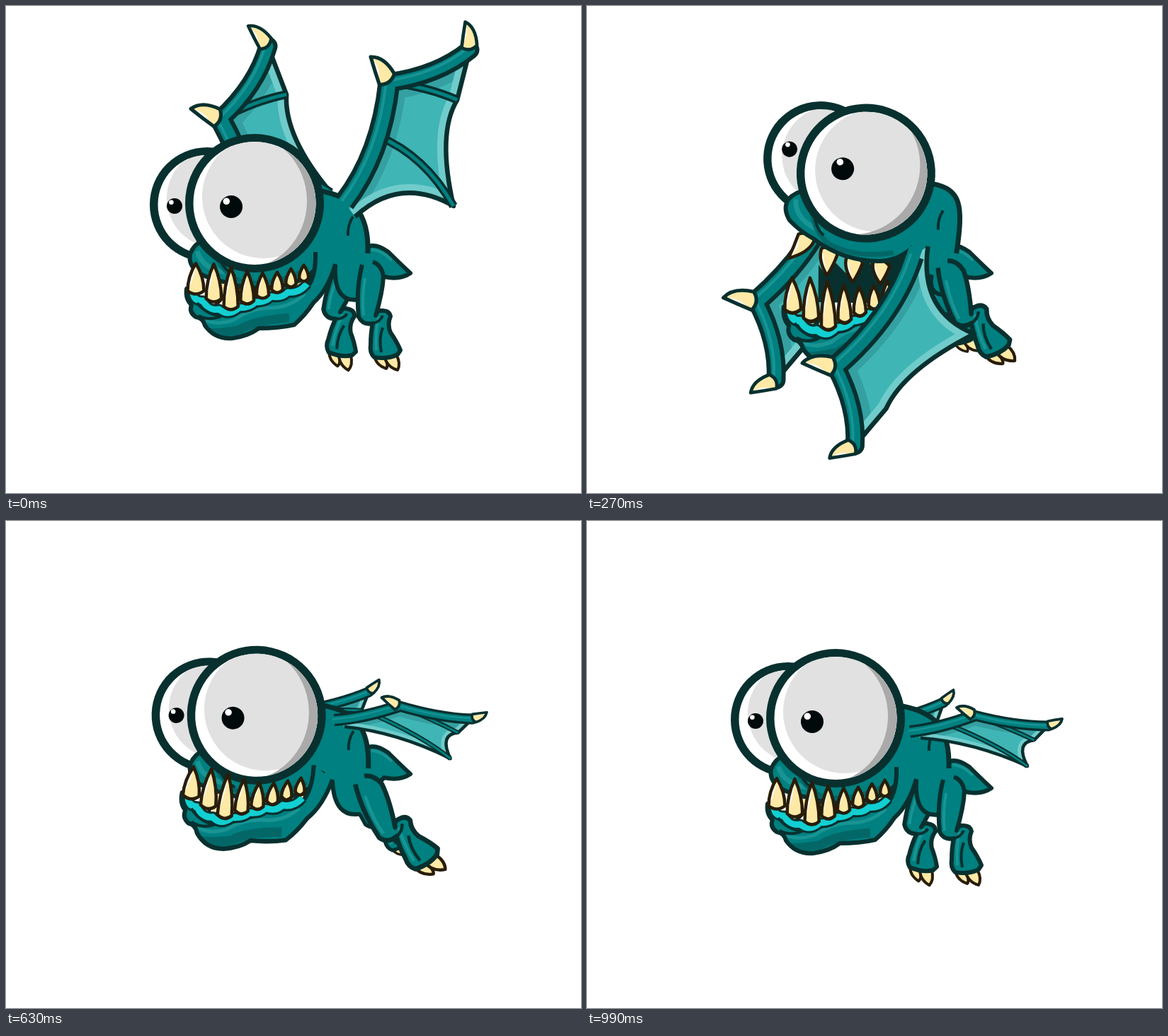
These frames come from a looping animation (812x689 px, 1.08 s). An HTML page with a canvas:

```html
<!DOCTYPE html>
<html lang="en">
<head>
<meta charset="utf-8">
<title>Flying monster</title>
<style>
html, body { margin: 0; width: 100%; height: 100%; overflow: hidden; background: #fff; }
canvas { display: block; }
</style>
</head>
<body>
<canvas id="stage" width="812" height="689"></canvas>
<script>
const ctx = document.getElementById('stage').getContext('2d');
const STEP = 90, STEPS = 12;
const INK = '#08302f', TEAL = '#008080', LIGHT = '#189494', SHADE = '#046767';
const BROWN = '#291d0a', CREAM = '#ffe9a6';

const lerp = (a, b, t) => a + (b - a) * t;
const mix = (a, b, t) => a.map((v, i) => lerp(v, b[i], t));
const P = d => new Path2D(d);

// Rotation and scale around one point, which lands on another
const pivot = (from, to, turn, sx = 1, sy = sx) =>
  new DOMMatrix().translate(...to).rotate(turn).scale(sx, sy).translate(-from[0], -from[1]);

// Wing skeletons: shoulder, wrist, finger tip, web corner, wrist claw,
// curl, and the far wing's turn and offset
const UP = [[478, 278], [541, 108], [655, 62], [632, 283], [515, 72], [1], [-35, -238, 52]];
const FLAT = [[456, 298], [547, 275], [651, 290], [622, 347], [522, 264], [.45], [-25, -144, 12]];
const DOWN = [[455, 368], [404, 552], [467, 648], [573, 443], [358, 563], [-1], [0, -136, -50]];

const SNOUT = P('M280 330Q265 337 260 351Q257 366 272 378Q292 388 312 391Q336 399 362 399Q390 398 413 389Q438 378 448 355');
const MOUTH = P('M304 395L306 349L317 364L330 347L344 360L353 347L364 356L374 343L384 356L396 335L440 350L440 385L425 400Z');
const JAW = P('M437 348Q438 382 426 397Q405 400 380 414Q355 425 330 432Q302 438 280 422Q268 412 255 400Q253 415 262 423Q258 433 268 440Q278 441 281 452Q295 472 320 470Q342 467 357 456Q385 456 407 451Q422 438 434 420Q455 401 465 365');
const GUM = P('M264 406Q266 418 278 417Q286 432 301 429Q314 440 329 427Q345 427 352 419Q368 419 374 411Q391 414 398 405Q414 407 425 393');
const CHIN = P('M281 445Q300 452 322 444Q345 428 372 427Q402 427 422 407');
const LOWLIP = P('M270 420Q282 436 304 439Q286 446 272 438');
const LEG = P('M503 366Q494 400 498 440Q504 452 518 449Q515 462 515 479Q513 490 520 497Q540 500 553 493L557 487Q552 475 543 462Q538 450 543 439Q541 430 530 431Q524 430 522 438Q532 405 533 382Q530 366 518 362');
const TOES = ['M520 494Q522 508 537 513Q541 508 534 496Z', 'M534 495Q538 511 553 515Q558 506 551 493Z'].map(P);
const TAIL = P('M508 342Q520 334 540 348Q552 360 571 378Q556 388 534 383Q520 400 505 392');

function fill(path, color) { ctx.fillStyle = color; ctx.fill(path); }
function stroke(path, color, width, cap = 'butt') {
  ctx.strokeStyle = color;
  ctx.lineWidth = width;
  ctx.lineCap = cap;
  ctx.stroke(path);
}
function shape(path, color, ink, width) { fill(path, color); stroke(path, ink, width); }

function within(m, draw) {
  ctx.save();
  ctx.transform(m.a, m.b, m.c, m.d, m.e, m.f);
  draw();
  ctx.restore();
}

function clipped(path, draw) {
  ctx.save();
  ctx.clip(path);
  draw();
  ctx.restore();
}

function tooth(tx, ty, bx, by, h) {
  const my = lerp(ty, by, .45), d = Math.sign(by - ty) * 3;
  const left = `M${tx} ${ty}Q${bx - h} ${my} ${bx - h} ${by - d}`;
  const body = P(`${left}Q${bx} ${by + 2 * d} ${bx + h} ${by - d}Q${bx + h} ${my} ${tx} ${ty}Z`);
  fill(body, CREAM);
  fill(P(`${left}Q${bx - h * .1} ${my} ${tx} ${ty}Z`), '#fff');
  stroke(body, BROWN, 4.5);
}

function lowerTeeth() {
  for (let i = 7; i >= 0; i--) {
    const x = 268 + 26 * i - .6 * i * i;
    const base = 428 - (i < 2 ? 11 : 8) * Math.abs(i - 2);
    tooth(x, 371 + 7 * Math.sin(i * .8 - 1.8), x, base, 11.5 - .7 * i);
  }
}

function upperTeeth() {
  for (let i = 0; i < 4; i++) {
    const x = 302 + 37.5 * i, y = 389 + 9 * Math.sin(i * Math.PI / 3);
    tooth(x + (i ? 8 : -14), y + 40 - 3 * i, x, y, 12);
  }
}

function claw(base, tip, half) {
  const dx = tip[0] - base[0], dy = tip[1] - base[1], len = Math.hypot(dx, dy) || 1;
  const nx = -dy / len * half, ny = dx / len * half;
  const at = (t, s) => `${base[0] + dx * t + nx * s} ${base[1] + dy * t + ny * s}`;
  const body = P(`M${at(.12, -1)}Q${at(.55, -.55)} ${at(1, 0)}Q${at(.75, 1.25)} ${at(.12, 1)}Q${at(-.1, 0)} ${at(.12, -1)}Z`);
  fill(body, CREAM);
  fill(P(`M${at(.2, -1)}Q${at(.6, -.5)} ${at(1, 0)}Q${at(.5, .3)} ${at(.2, -1)}Z`), '#fff');
  stroke(body, INK, 2.5 + half / 5);
}

function wing([S, W, T, corner, tip, [curl]], spread) {
  const w = .45 + .55 * curl * curl;
  // Point beside the line a-b, in units of its length
  const beside = (a, b, t, side) => [
    lerp(a[0], b[0], t) - (b[1] - a[1]) * side,
    lerp(a[1], b[1], t) + (b[0] - a[0]) * side
  ];
  const M = beside(S, W, .45, .14 * curl), F = beside(W, T, .55, .14 * curl);
  const along = 1 - .35 * Math.abs(curl);
  const D = beside(W, T, along, .48 * curl), A = mix(T, D, .5);
  const B = mix(S, corner, spread), R = [S[0] + 15, S[1] + 20 * curl];
  const pull = (a, b) => mix(mix(a, b, .5), W, .28);

  const bones = `Q${M} ${W}Q${F} ${T}`;
  const rim = `L${A}L${D}Q${pull(D, B)} ${B}Q${pull(B, R)} ${R}`;
  const edge = P(`M${T}${rim}`), web = P(`M${S}${bones}${rim}Z`);
  const arm = P(`M${S}Q${M} ${W}`), finger = P(`M${W}Q${F} ${T}`);

  fill(web, '#40b5b5');
  clipped(web, () => {
    stroke(P(`M${S}${bones}`), '#35a0a1', 50 * w);
    stroke(edge, '#70cccb', 25 * w);
  });
  stroke(edge, INK, 2 + 4.5 * w);

  if (curl > 0) {
    const elbow = mix(mix(S, M, .6), mix(M, W, .6), .6);
    const ribs = P(`M${W}Q${mix(mix(W, D, .5), T, .1)} ${D}M${elbow}Q${mix(mix(elbow, B, .5), D, .22)} ${B}`);
    stroke(ribs, INK, 12 * w);
    stroke(ribs, TEAL, 5 * w);
  }

  stroke(arm, INK, 31 * w);
  stroke(finger, INK, 27 * w, 'round');
  stroke(P(`M${mix(S, M, -.14)}L${S}Q${M} ${W}`), TEAL, 19 * w);
  stroke(finger, TEAL, 15 * w, 'round');
  within(new DOMMatrix().translate(-4 * w, -2 * w), () => stroke(P(`M${S}${bones}`), LIGHT, 4 * w));

  const aim = Math.atan2(T[1] - F[1], T[0] - F[0]) - curl * Math.PI / 3;
  claw(W, tip, 13 * w);
  claw(T, [T[0] + 40 * w * Math.cos(aim), T[1] + 40 * w * Math.sin(aim)], 11 * w);
}

function disc(x, y, rx, ry, color) {
  ctx.beginPath();
  ctx.ellipse(x, y, rx, ry, 0, 0, 7);
  ctx.fillStyle = color;
  ctx.fill();
}

function eye(x, y, r, px, py, pr) {
  disc(x, y, r, r, INK);
  const ball = new Path2D(), shade = new Path2D();
  ball.ellipse(x, y, r - 11.5, r - 11, 0, 0, 7);
  shade.rect(x - 120, y - 120, 240, 240);
  shade.ellipse(x - 18, y - 3, r - 6, r - 2, 0, 0, 7);
  fill(ball, '#fff');
  clipped(ball, () => {
    disc(x + 13, y - 9, r - 11, r - 11, '#e1e1e1');
    ctx.fillStyle = '#aaa';
    ctx.fill(shade, 'evenodd');
  });
  disc(px, py, pr, pr, '#000a0a');
  disc(px - pr * .42, py - pr * .48, pr * .3, pr * .3, '#fff');
}

function leg(x, y, turn, scale) {
  within(pivot([515, 385], [x, y], turn, scale), () => {
    TOES.forEach(t => shape(t, CREAM, BROWN, 4));
    shape(LEG, TEAL, INK, 6);
    stroke(P('M507 385Q502 415 505 438M526 440Q521 465 523 487'), LIGHT, 4);
    stroke(P('M518 449Q528 447 532 438M532 455Q526 470 530 490'), INK, 4);
  });
}

function drawBody(dx, dy, head, jaw) {
  const at = (m, x, y) => { const q = m.transformPoint(new DOMPoint(x, y)); return `${q.x} ${q.y}`; };
  const nx = 446 + .97 * dx, ny = 262 + .25 * dy;
  const back = `M${nx} ${ny}C${nx + 40} ${ny + 8} ${513 + .45 * dx} ${288 + .2 * dy} ${511 + .25 * dx} 350`;
  const low = `${500 + .25 * dx} ${415 + .15 * dy}`;
  const belly = `Q${462 + .45 * dx} ${422 + .25 * dy} ${at(jaw, 465, 366)}`;
  fill(P(`${back}L524 388L${low}${belly}L${at(jaw, 437, 350)}L${at(head, 425, 374)}L${at(head, 351, 279)}Z`), TEAL);
  stroke(P(back), INK, 7);
  stroke(P(`M${low}${belly}`), INK, 6);
  stroke(P(`M${490 + .3 * dx} ${298 + .2 * dy}q-8 12 -7 27`), INK, 4);
}

function drawHead() {
  fill(SNOUT, TEAL);
  clipped(SNOUT, () => {
    stroke(P('M270 347Q278 375 320 378'), LIGHT, 7);
    stroke(P('M300 360Q312 383 336 391Q380 397 425 372'), SHADE, 7);
  });
  stroke(SNOUT, INK, 6);
  stroke(P('M302 358Q308 374 324 382'), INK, 4);
  eye(351, 279, 98, 318, 284, 16);
}

function drawJaw() {
  fill(JAW, TEAL);
  clipped(JAW, () => {
    stroke(P('M282 462Q300 464 330 458Q350 445 400 441'), SHADE, 13);
    stroke(CHIN, LIGHT, 5);
  });
  stroke(JAW, INK, 6);
  stroke(GUM, INK, 15);
  stroke(GUM, '#12cfd2', 9);
  stroke(LOWLIP, INK, 4);
  lowerTeeth();
}

function draw(i) {
  // The head rears for half the loop, then the mouth snaps shut
  const snap = i > 6 ? .07 ** (i - 7) : 0;
  const rear = i > 6 ? .07 * snap : Math.sin(i * Math.PI / 12);
  const swing = i > 6 ? Math.max(0, 1 - (i - 6) / 3) : i / 6;
  const lift = i > 6 ? 11 - i : 0;
  const open = rear ** 1.3, turn = 27.6 * rear;
  const dx = 65 * rear ** 1.2, dy = -60 * rear;

  const head = pivot([351, 279], [351 + dx, 279 + dy], turn);
  const jaw = pivot([345, 400], [345 + 32 * rear - 9 * snap, 400 + 37 * open - 9 * snap],
    5 * snap - 4.5 * rear ** 3, 1, 1 + .235 * open + .05 * snap);

  // Two wing beats per loop
  const beat = 3 - Math.abs(i % 6 - 3);
  const [from, to, t] = beat < 1 ? [UP, FLAT, beat] : [FLAT, DOWN, (beat - 1) / 2];
  const pose = from.map((v, k) => mix(v, to[k], t));
  const [S, W, , , , [curl], [farTurn, fx, fy]] = pose;
  const shoulder = pivot(S, [
    S[0] + rear * lerp(8, 44, (curl + 1) / 2) + 5 * snap,
    S[1] - 20 * rear - 15 * snap
  ], turn);
  const farSide = pivot(W, [W[0] + fx, W[1] + fy], farTurn);

  ctx.fillStyle = '#fff';
  ctx.fillRect(0, 0, 812, 689);
  ctx.lineJoin = 'round';

  within(shoulder.multiply(farSide), () => wing(pose, .85));
  within(new DOMMatrix().translate(0, -5 * lift), () => {
    shape(TAIL, TEAL, INK, 6);
    stroke(P('M516 345Q530 345 545 360'), LIGHT, 4);
  });
  leg(478 + 34 * swing, 380, 14 - 72 * swing ** 1.5, 1 - .2 * swing);
  within(head, () => eye(284, 281, 81, 238, 283, 11));
  within(jaw, () => fill(MOUTH, INK));
  within(head, () => {
    fill(P('M390 385L413 389L448 355L450 400L410 410Z'), INK);
    upperTeeth();
  });
  drawBody(dx, dy, head, jaw);
  within(head, drawHead);
  within(jaw, drawJaw);
  leg(515, 385, -42 * swing, 1 + .17 * swing);
  within(shoulder, () => wing(pose, 1));
}

const start = performance.now();
function tick() {
  draw(Math.floor((performance.now() - start) / STEP) % STEPS);
  requestAnimationFrame(tick);
}
tick();
</script>
</body>
</html>
```
